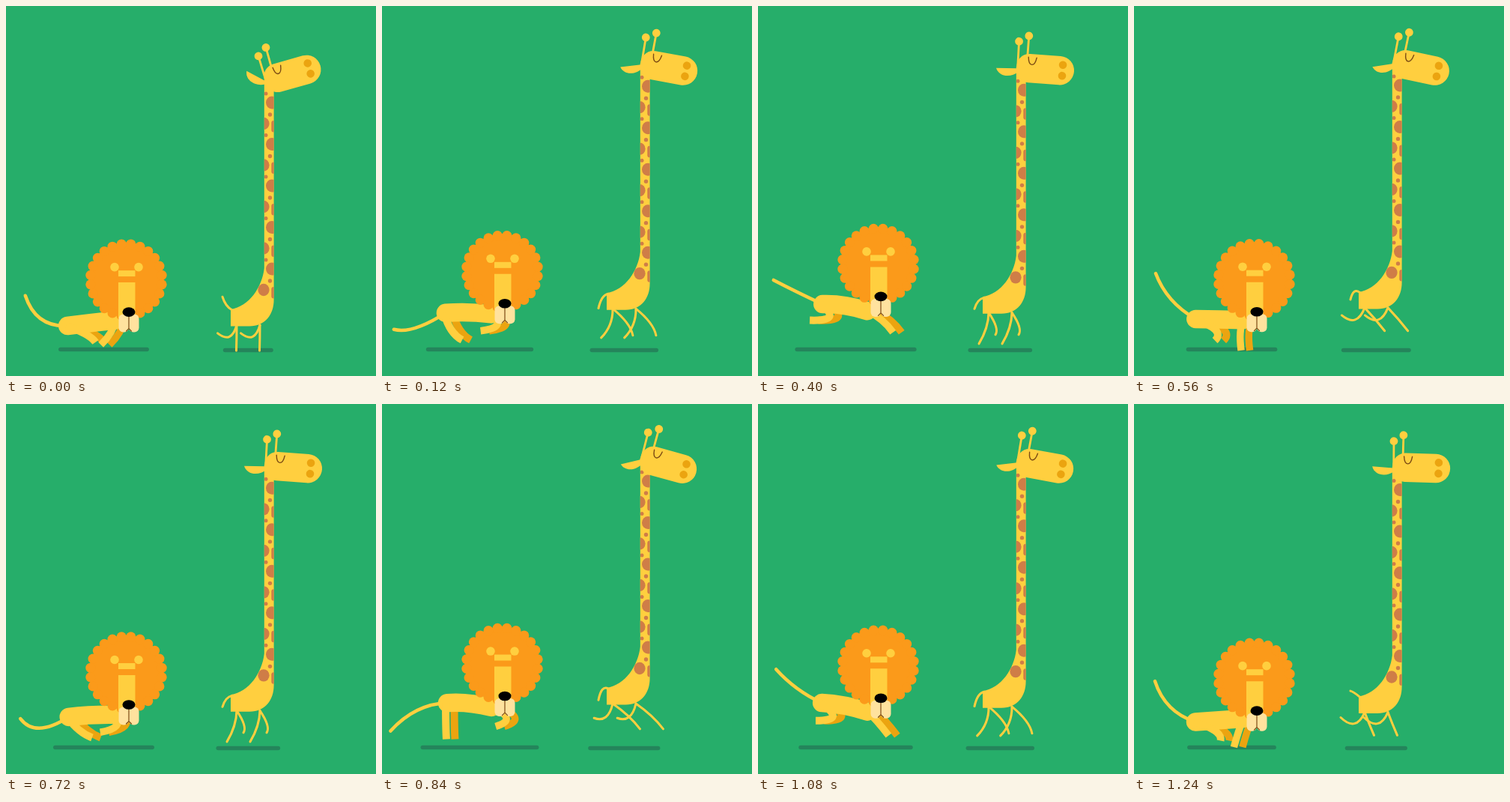
Recreate the animation shown at these times as an HTML page with a canvas. Size 494 by 494 pixels, loop 1280 ms.

```html
<!DOCTYPE html>
<html>
<head>
<meta charset="utf-8">
<style>
  html, body { margin: 0; overflow: hidden; background: #26ae6a; }
  canvas { display: block; }
</style>
</head>
<body>
<canvas id="stage" width="494" height="494"></canvas>
<script>
const ctx = document.getElementById('stage').getContext('2d');
const GREEN = '#26ae6a', SHADOW = '#24855b', YELLOW = '#ffcf3f', AMBER = '#eba410',
      ORANGE = '#fb9a1a', SPOT = '#cf7d47', CREAM = '#ffe29e', BROWN = '#7b4a14';
const LOOP = 1280, STEP = 40, STRIDE = 640, BOUNCE = 320;
const DEG = Math.PI / 180;

// A swing around a mean that peaks at a given angle of the cycle,
// with an optional overtone at twice the speed.
const cycle = (time, period) => (mean, amp, peak, amp2 = 0, peak2 = 0) => {
  const angle = 360 * time / period;
  return mean + amp * Math.cos((angle - peak) * DEG) + amp2 * Math.cos(2 * (angle - peak2) * DEG);
};

function at(x, y, degrees, draw) {
  ctx.save();
  ctx.translate(x, y);
  ctx.rotate(degrees * DEG);
  draw();
  ctx.restore();
}
function dot(x, y, rx, color, ry = rx) {
  ctx.fillStyle = color;
  ctx.beginPath();
  ctx.ellipse(x, y, rx, ry, 0, 0, 7);
  ctx.fill();
}
function box(x, y, w, h, color, radii = 0) {
  ctx.fillStyle = color;
  ctx.beginPath();
  ctx.roundRect(x, y, w, h, radii);
  ctx.fill();
}
function stroke(path, width, color, cap = 'round') {
  ctx.strokeStyle = color;
  ctx.lineWidth = width;
  ctx.lineCap = cap;
  ctx.stroke(new Path2D(path));
}
const curve = (x, y, bend, end, width, color, cap) =>
  stroke(`M${x} ${y}Q${bend} ${end}`, width, color, cap);
const shadow = (x, y, half) => box(x - half, y - 2.8, half * 2, 5.6, SHADOW, 2.8);

function lionHead() {
  dot(160.5, 367, 50, ORANGE);
  for (let i = 0.5; i < 24; i++) {
    const a = i * 15 * DEG;
    dot(160.5 + 48 * Math.cos(a), 367 + 48 * Math.sin(a), 6.6, ORANGE);
  }
  for (const side of [-1, 1]) {
    dot(161 + 16 * side, 350, 5.8, YELLOW);
    dot(164 + 4 * side, 375.7, 2.2, '#000', 3);
  }
  box(150, 354.5, 22.5, 8, YELLOW);
  box(150, 370.5, 22.5, 48, YELLOW);
  box(150.5, 413, 13.5, 24, CREAM, [6, 0, 6, 6]);
  box(164, 413, 13.5, 24, CREAM, [0, 6, 6, 6]);
  stroke('M164 412V432M160.5 435.5L164 432L167.5 435.5', 1.2, BROWN);
  dot(164, 410, 8.5, '#000', 6.3);
}

function lion(time) {
  const swing = cycle(time, STRIDE);
  const lift = swing(13.8, 12.5, 168, 1.5, 48);
  const rumpX = swing(85, 3, 160), rumpY = swing(408, 14, 0, 5, 0);
  const chestY = swing(411, 9, 340);
  const hindBend = [swing(105, 20, 290), swing(430, 9, 30)];
  const hindFoot = [swing(92, 28, 10), swing(439, 13, 40, 6.5, 135)];
  const foreBend = [swing(163, 24, 145), swing(425, 11, 0)];
  const foreFoot = [swing(153, 29, 205), swing(441, 15, 320, 4, 135)];
  const legs = color => {
    curve(rumpX - 2, rumpY, hindBend, hindFoot, 10, color, 'butt');
    curve(146, chestY, foreBend, foreFoot, 9.5, color, 'butt');
  };

  shadow(130.5, 458.5, 59 + lift);
  curve(rumpX, rumpY, [swing(45, 6, 210), swing(402, 33, 35, 12, 45)],
    [swing(20, 9, 310), swing(393, 45, 98)], 4.5, YELLOW);
  at(11.5, 0, 0, () => legs(AMBER));
  curve(rumpX, rumpY, [114, (rumpY + chestY) / 2 - lift / 4], [146, chestY], 24.5, YELLOW);
  legs(YELLOW);
  at(0, -lift, 0, lionHead);
}

const giraffeBody = new Path2D(
  'M344.8 98V350C342 375 325 401 300 405V427.5H325C346 427.5 357.6 412 357.6 392V98Z');

function giraffeTrunk() {
  ctx.fillStyle = YELLOW;
  ctx.fill(giraffeBody);
  ctx.clip(giraffeBody);
  for (let y = 129; y < 400; y += 55.5) {
    dot(347, y - 12, 2.5, SPOT);
    dot(355, y, 8, SPOT, 8.5);
    dot(352.5, y + 16, 2.7, SPOT);
    dot(344, y + 28, 7.6, SPOT, 8.2);
    box(354.3, y + 24, 8, 15.5, SPOT, 3);
  }
}

function giraffeEar() {
  ctx.fillStyle = YELLOW;
  ctx.fill(new Path2D('M0 0H-28C-24 12 -8 13 2 4Z'));
}

function giraffeHead() {
  stroke('M-5.2 -34L-4.5 0M7.5 -42V-16', 2.8, YELLOW);
  dot(-5.2, -34, 5.4, YELLOW);
  dot(7.5, -42.3, 5.4, YELLOW);
  box(-6, -18.5, 77, 38.5, YELLOW, [17, 19.2, 19.2, 17]);
  stroke('M9 -14C10 -1 18 -1 20 -14', 1.4, BROWN);
  dot(55.5, -7, 5.3, AMBER);
  dot(55.5, 7.5, 5.3, AMBER);
}

function giraffeLeg(time) {
  const swing = cycle(time, STRIDE);
  curve(0, -1, [swing(4.5, 14.5, 284, 8.4, 81), swing(20, 6, 140)],
    [swing(-2, 30.7, 294, 11, 90), swing(27, 12, 345, 9.3, 63)], 3, YELLOW);
}

function giraffeTail(time) {
  const swing = cycle(time, BOUNCE);
  curve(1, 1, [-8, swing(-2, 5, 110)], [-12, swing(6.5, 17, 170, 6.5, 90)], 3, YELLOW);
}

function giraffe(time) {
  // Quick parabolic fall after a slower rise.
  const p = time % BOUNCE - 200;
  const lift = 26 * (1 - (p / (p < 0 ? 200 : 120)) ** 2);

  shadow(323.3, 459.5, 33.5 + 0.56 * lift);
  at(0, -lift, 0, () => {
    for (const hip of [308, 339])
      for (const delay of [0, STRIDE / 2]) at(hip, 427, 0, () => giraffeLeg(time + delay));
    at(301, 405, 0, () => giraffeTail(time));
    at(0, 0, 0, giraffeTrunk);
    at(346, 100, 28 - 1.6 * lift, giraffeEar);
    at(351.2, 98.2, 1.2 * lift - 15.7, giraffeHead);
  });
}

function frame(now) {
  const time = Math.floor(now % LOOP / STEP) * STEP;
  ctx.fillStyle = GREEN;
  ctx.fillRect(0, 0, 494, 494);
  lion(time);
  giraffe(time);
  requestAnimationFrame(frame);
}
frame(0);
</script>
</body>
</html>
```
